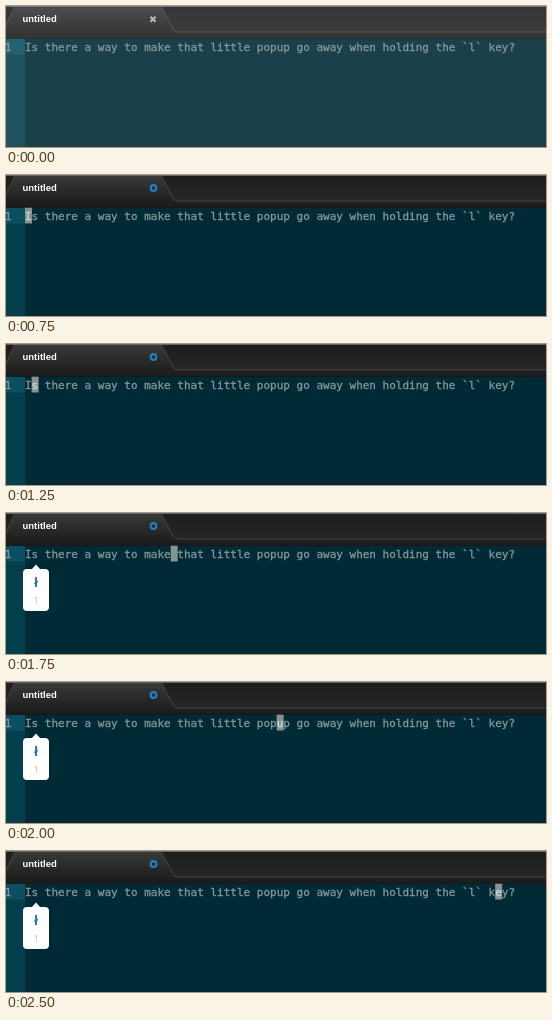
Animation, 540 px wide and 141 px high, one loop 4750 ms. Source, as an HTML page:

```html
<!DOCTYPE html>
<html lang="en">
<head>
<meta charset="utf-8">
<title>Key popup</title>
<style>
  html, body { margin: 0; width: 100%; height: 100%; overflow: hidden; background: #002b36; }
  svg { display: block; width: 540px; height: 141px; }
  .code { font: 11px "DejaVu Sans Mono", monospace; white-space: pre; stroke-width: .3; }
  .plain { fill: #84989a; stroke: #84989a; }
  .tab { font: bold 9.5px "Liberation Sans", Arial, sans-serif; }
  .popup { font-family: "Open Sans", sans-serif; text-anchor: middle; }
</style>
</head>
<body>
<svg viewBox="0 0 540 141">
  <defs>
    <linearGradient id="bar" x2="0" y2="1">
      <stop stop-color="#1e1e1e"/><stop offset="1" stop-color="#262626"/>
    </linearGradient>
    <linearGradient id="tab" x2="0" y2="1">
      <stop stop-color="#383b39"/><stop offset=".75" stop-color="#202120"/><stop offset="1" stop-color="#1b1b1b"/>
    </linearGradient>
    <clipPath id="block"><rect id="blockClip" y="32.7" width="7" height="15.8"/></clipPath>
  </defs>

  <rect width="540" height="141" fill="#002b36"/>
  <rect y="33" width="19" height="108" fill="#043f4d"/>
  <rect y="33" width="19" height="15.5" fill="#0b5062"/>

  <rect width="540" height="28" fill="url(#bar)"/>
  <path d="M0 20L9 0H155L167 23Q168.500 26 171 26H540V33H0Z" fill="url(#tab)"/>
  <path d="M0 20L9 0M155 0L167 23Q168.500 26 171 26H540" fill="none" stroke="#434343"/>
  <rect y="32" width="540" height="1" fill="#141a1c"/>
  <rect width="540" height="1" fill="#66667a"/>

  <rect id="veil" width="540" height="141" fill="#fff" opacity=".1"/>

  <text class="tab" x="16.5" y="16.3" fill="#fff">untitled</text>
  <path id="close" d="M144.500 10.800l5 5m0-5l-5 5" stroke="#bcbcbc" stroke-width="2"/>
  <circle id="dirty" cx="147.500" cy="13" r="2.900" fill="none" stroke="#2080c4" stroke-width="2.100"/>

  <text class="code plain" x="-1.300" y="44.500">1</text>
  <text class="code plain line" x="19" y="44.500"></text>
  <rect id="cursor" y="32.7" width="7" height="15.8" fill="#869391"/>
  <text class="code line" x="19" y="44.500" fill="#d0d8d4" stroke="#d0d8d4" clip-path="url(#block)"></text>

  <g id="popup" class="popup">
    <path d="M21 56H26L30 51.5L34 56H39Q43 56 43 60V94Q43 98 39 98H21Q17 98 17 94V60Q17 56 21 56Z" fill="#fff"/>
    <text x="30" y="73.500" font-size="12.5" font-weight="bold" fill="#1f6dba">ł</text>
    <text x="30" y="91" font-size="9" fill="#bcbcbc">1</text>
  </g>
</svg>
<script>
  const LOOP = 4750, PITCH = 6.622, LEFT = 19;
  const LINE = "Is there a way to make that little popup go away when holding the `l` key?";
  // Start time in ms and cursor column; -1 hides the cursor.
  const STEPS = [
    [0, -1], [750, 0], [1250, 1], [1500, 5],
    [1750, 22], [2000, 38], [2250, 55], [2500, 71]
  ];
  const EDITED = 250, POPUP = 1500;

  const byId = id => document.getElementById(id);
  const show = (id, on) => byId(id).setAttribute("visibility", on ? "visible" : "hidden");
  document.querySelectorAll(".line").forEach(el => el.textContent = LINE);

  function draw(time) {
    const t = time % LOOP;
    const column = STEPS.filter(([start]) => start <= t).pop()[1];
    const x = column < 0 ? -20 : LEFT + column * PITCH;
    byId("cursor").setAttribute("x", x);
    byId("blockClip").setAttribute("x", x);
    show("veil", t < EDITED);
    show("close", t < EDITED);
    show("dirty", t >= EDITED);
    show("popup", t >= POPUP);
  }

  const origin = performance.now();
  function tick() {
    draw(performance.now() - origin);
    requestAnimationFrame(tick);
  }
  tick();
</script>
</body>
</html>
```
